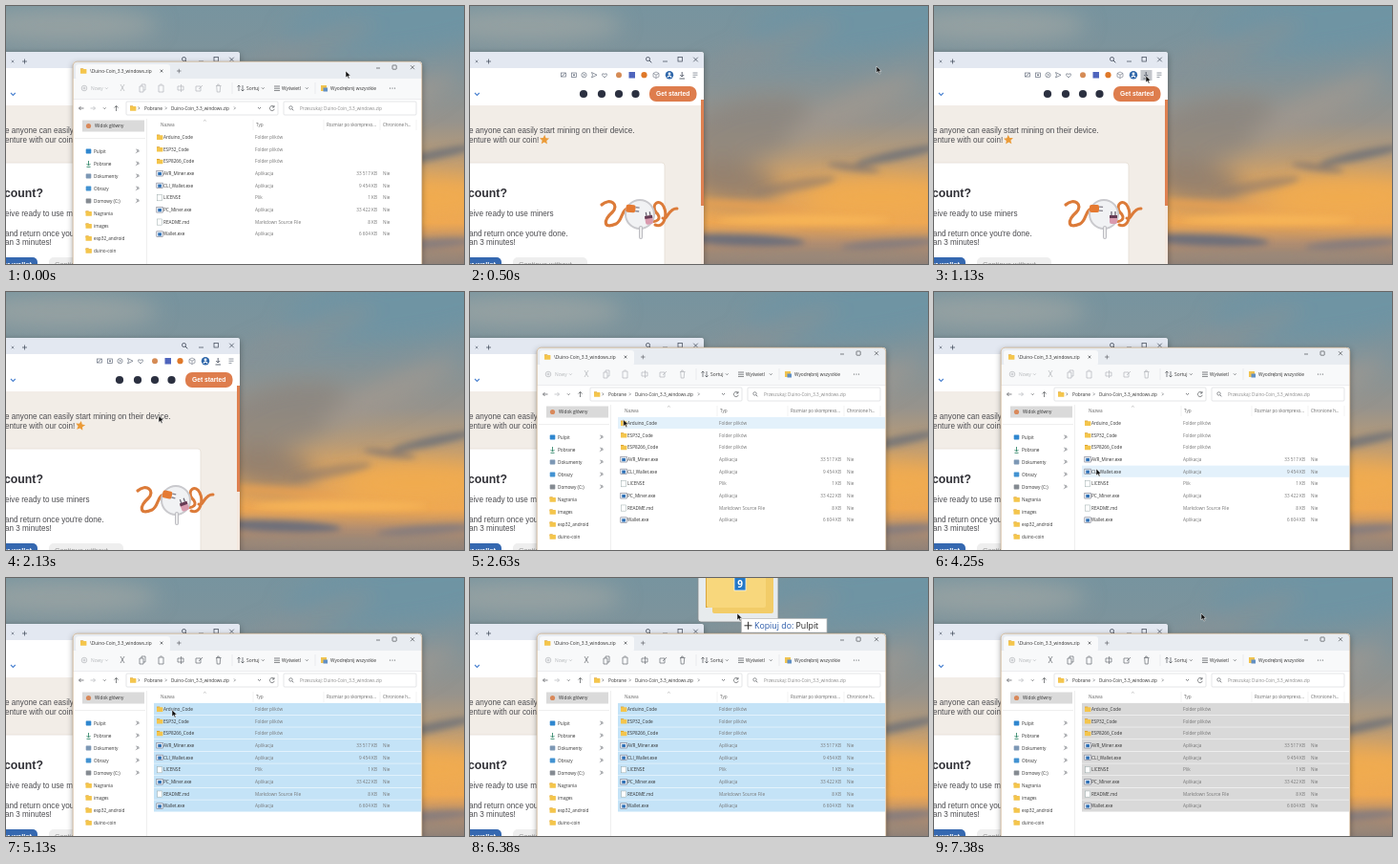
An HTML page that plays this animation: 480x270 px, repeating every 8 s.

```html
<!DOCTYPE html>
<html lang="pl">
<head>
<meta charset="utf-8">
<style>
html, body { margin: 0; width: 100%; height: 100%; overflow: hidden; }
svg { display: block; width: 480px; height: 270px; }
text { font-family: "Open Sans", "Noto Sans", sans-serif; white-space: pre; }
.page text { font-family: "Liberation Sans", Arial, sans-serif; }
</style>
</head>
<body>
<svg id="stage" viewBox="0 0 480 270" xmlns="http://www.w3.org/2000/svg"></svg>
<script>
const stage = document.getElementById('stage');

const rect = (x, y, w, h, fill, more = '') =>
  `<rect x="${x}" y="${y}" width="${w}" height="${h}" fill="${fill}" ${more}/>`;
const disc = (x, y, r, fill, more = '') =>
  `<circle cx="${x}" cy="${y}" r="${r}" fill="${fill}" ${more}/>`;
const line = (d, color = '#555', w = .7, more = '') =>
  `<path d="${d}" fill="none" stroke="${color}" stroke-width="${w}" ${more}/>`;
const text = (x, y, s, size = 4.7, fill = '#333', more = '') =>
  `<text x="${x}" y="${y}" font-size="${size}" fill="${fill}" ${more}>${s}</text>`;
const cross = (x, y, r, color) =>
  line(`M${x - r} ${y - r}l${2 * r} ${2 * r}m0 ${-2 * r}l${-2 * r} ${2 * r}`, color);
const box = (x, y, w, h, color, more = '') =>
  rect(x, y, w, h, 'none', `stroke="${color}" stroke-width=".7" ${more}`);
const folder = (x, y) =>
  rect(x - 3, y - 2.6, 3.2, 2, '#d99a25') + rect(x - 3, y - 1.9, 6.4, 4.6, '#f4c54c', 'rx=".5"');
const blob = (x, y, rx, ry, fill, o, turn = 0) =>
  `<ellipse cx="${x}" cy="${y}" rx="${rx}" ry="${ry}" fill="${fill}" opacity="${o}" transform="rotate(${turn} ${x} ${y})"/>`;
const gradient = (id, stops, dir) =>
  `<linearGradient id="${id}" ${dir}>${stops.map(([at, c]) => `<stop offset="${at}" stop-color="${c}"/>`).join('')}</linearGradient>`;

const defs = `<defs>
  ${gradient('sky', [[0, '#77949f'], [.25, '#80939a'], [.45, '#97938c'], [.58, '#b79b78'],
    [.7, '#dfa55e'], [.84, '#eea753'], [.92, '#b08d71'], [1, '#908278']], 'x2="0" y2="1"')}
  <filter id="soft" x="-50%" y="-80%" width="200%" height="260%"><feGaussianBlur stdDeviation="11"/></filter>
  <filter id="mist" x="-50%" y="-80%" width="200%" height="260%"><feGaussianBlur stdDeviation="3"/></filter>
  <filter id="shade" x="-10%" y="-10%" width="120%" height="120%"><feDropShadow dx="0" dy="2" stdDeviation="3" flood-opacity=".35"/></filter>
</defs>`;

function sky() {
  return rect(0, 0, 480, 270, 'url(#sky)') + `<g filter="url(#soft)">` +
    blob(60, 20, 100, 18, '#a9aaa5', .6) + blob(420, 15, 130, 34, '#6b95a5', .7, -8) +
    blob(310, 45, 80, 9, '#8d9293', .7, -20) + blob(290, 130, 70, 32, '#8b847d', .75, -15) +
    blob(400, 105, 80, 14, '#a69c91', .6, -25) + blob(275, 185, 50, 22, '#877a70', .8, 8) +
    blob(430, 200, 80, 22, '#f4ad4d', .8) + '</g><g filter="url(#mist)">' +
    blob(448, 156, 46, 5, '#666d79', .75, -12) + blob(402, 169, 28, 4, '#80766f', .7, 8) +
    blob(340, 188, 44, 6, '#927e6d', .6, -10) + blob(290, 209, 60, 5, '#e8a053', .8, 4) +
    blob(350, 224, 90, 5, '#f8b657', .9) + blob(285, 245, 66, 6, '#656c7d', .9, 2) +
    blob(440, 249, 52, 5, '#7b7880', .75, -4) + blob(350, 262, 130, 5, '#9b897b', .7) + '</g>';
}

function browser() {
  const dark = '#394252', gray = '#697180';
  let s = `<g class="page">` + rect(-20, 48, 265, 240, '#f2ede7', 'rx="3" filter="url(#shade)"') +
    rect(-20, 48, 265, 18, '#e3e8f1', 'rx="3"') + rect(-20, 65, 265, 39, '#fff') +
    cross(7, 58, 1.3, gray) + line('M17 58h5m-2.5 -2.5v5', dark) +
    disc(186.5, 55.5, 2, 'none', `stroke="${dark}" stroke-width=".8"`) + line('M188 57l2.3 2.3', dark, .9) +
    line('M202 58h5', dark) + box(218, 53.5, 4.5, 4.5, dark) + cross(236.5, 56, 2.3, dark);

  s += box(95.5, 70, 5, 4, gray) + line('M96 74l4 -4', gray) + box(106.5, 70, 5, 4.5, gray) +
    disc(109, 72.2, 1, gray) + disc(119.5, 72.2, 2.6, 'none', `stroke="${gray}" stroke-width=".7"`) +
    line('M118.5 71l2 1.2l-2 1.2', gray) + line('M127.5 69.5l5.5 2.7l-5.5 2.7l1 -2.7z', gray) +
    line('M141 75l-2.5 -2.7q-.5 -2.5 2.5 -1q3 -1.5 2.5 1z', gray) +
    disc(156, 72.2, 3, '#d58b55') + rect(166.5, 69, 6.5, 6.5, '#4f65bd') + disc(182.5, 72.2, 3.1, '#df7829') +
    line('M195 69l3 1.5v3.5l-3 1.5l-3 -1.5v-3.5zM192 70.5l3 1.6l3 -1.6m-3 1.6v3.4', gray, .6) +
    disc(209, 72.2, 4.2, '#2f67aa') + disc(209, 71, 1.4, '#fff') + line('M206.8 74.6q2.2 -3 4.4 0', '#fff', 1.2) +
    rect(216.5, 67, 12, 11, '#c3c6cb', 'id="press"') +
    line('M222.2 69v5m-2 -2l2 2l2 -2M219.5 76h5.5', dark, .8) +
    line('M233.5 70h5m-5 2.2h5m-5 2.2h3', gray);

  s += line('M5 91l2.4 2.4l2.4 -2.4', '#4d84d1', 1.2) +
    [119, 138, 156, 173.5].map(x => disc(x, 92, 4.1, '#2b3040')).join('') +
    rect(188, 84, 49.5, 16, '#de7d4d', 'rx="7"') +
    text(195, 94.4, 'Get started', 6.7, '#fff', 'font-weight="700"') +
    rect(242, 98, 3, 172, '#f4e8df') + rect(242, 98, 3, 111, '#de8050') +
    text(-1, 132.5, 'e anyone can easily start mining on their device.', 8.15, '#4c4c50') +
    text(-1, 142.8, 'enture with our coin!', 8.15, '#4c4c50') +
    `<path id="star" d="M0 -5L1.5 -1.7L5 -1.4L2.3 1L3.1 4.6L0 2.7L-3.1 4.6L-2.3 1L-5 -1.4L-1.5 -1.7Z" fill="#eb9b38"/>` +
    rect(-20, 164, 224, 130, '#fff', 'rx="3" stroke="#e5ddd5" stroke-width=".8"') +
    text(-2, 199.5, 'count?', 12.3, '#303036', 'font-weight="700"') +
    text(-1, 220, 'eive ready to use miners', 8.15, '#4c4c50') +
    text(-1, 240.5, "and return once you're done.", 8.15, '#4c4c50') +
    text(-1, 250.3, 'an 3 minutes!', 8.15, '#4c4c50') +
    rect(-20, 263, 53, 16, '#3568b0', 'rx="5"') + text(-3, 272.5, 'er wallet', 7.5, '#fff', 'font-weight="700"') +
    rect(45, 263, 78, 16, '#eeeeee', 'rx="5"') + text(51, 272.5, 'Continue without', 7.5, '#999');

  return s + line('M138 208C147 200 157 208 149 216C140 224 139 234 153 228C161 224 157 211 170 211', '#dc7b39', 3.2, 'stroke-linecap="round"') +
    line('M187 224C196 228 202 222 195 216C189 207 199 201 203 210C207 218 204 233 194 229M202 222C207 225 208 211 217 212', '#dc7b39', 3, 'stroke-linecap="round"') +
    disc(178, 218, 15, '#f1f2f4', 'stroke="#c9c9cd" stroke-width="2"') +
    `<g id="plugA">` + rect(-5, -4, 10, 8, '#e57a32', 'rx="2"') + line('M5 -2h4m-4 4h4', '#86828c', 1.3) + '</g>' +
    `<g id="plugB">` + rect(-4, -4, 8, 9, '#d99aae', 'rx="2"') + rect(-4, -4, 8, 3, '#663b54') + line('M-2 -4v-4m4 4v-4', '#66616e', 1.2) + '</g>' +
    line('M179 232v10', '#bcbcc1', 4, 'stroke-linecap="round"') + line('M179 232v10', '#eee', 2, 'stroke-linecap="round"') + '</g>';
}

const files = [
  ['Arduino_Code', 'Folder plików'], ['ESP32_Code', 'Folder plików'], ['ESP8266_Code', 'Folder plików'],
  ['AVR_Miner.exe', 'Aplikacja', '33 517 KB'], ['CLI_Wallet.exe', 'Aplikacja', '9 454 KB'],
  ['LICENSE', 'Plik', '1 KB'], ['PC_Miner.exe', 'Aplikacja', '33 422 KB'],
  ['README.md', 'Markdown Source File', '8 KB'], ['Wallet.exe', 'Aplikacja', '6 604 KB']];
const places = ['Pulpit', 'Pobrane', 'Dokumenty', 'Obrazy', 'Domowy (C:)', 'Nagrania', 'images', 'esp32_android', 'duino-coin'];
const rowY = i => 137.2 + i * 12.68;

function fileRow([name, type, size], i) {
  const y = rowY(i), base = y + 1.7;
  let icon = folder(161, y);
  if (size) icon = rect(158.7, y - 3, 5, 6.2, '#fff', 'stroke="#9aa" stroke-width=".5"');
  if (type === 'Aplikacja') icon = rect(157.8, y - 2.8, 6.6, 5.6, '#e8eef4', 'stroke="#667" stroke-width=".5"') + rect(159.3, y - 1.3, 3.6, 3.2, '#2d6fb5');
  return rect(155, y - 6.3, 280, 12.2, '#fff', 'class="row"') + icon + text(165, base, name) +
    text(261, base, type, 4.7, '#777') +
    (size ? text(389, base, size, 4.7, '#777', 'text-anchor="end"') + text(395, base, 'Nie', 4.7, '#777') : '');
}

function explorer() {
  const zip = 'Duino-Coin_3.3_windows.zip', faint = '#b4b7ba', ink = '#4c5054';
  let s = `<g id="explorer">` + rect(70, 58, 366, 230, '#fff', 'rx="4" filter="url(#shade)"') +
    rect(70, 58, 366, 25, '#e8ecf1', 'rx="4"') + rect(70, 76, 366, 22, '#f8f9fa') +
    rect(73, 61, 99, 16, '#f8f9fa', 'rx="3"') + folder(81, 68) +
    text(88, 69.9, '\\' + zip, 4.75) + cross(163, 68, 1.4, ink) + line('M179 68h4.5m-2.2 -2.2v4.5', ink, .6) +
    line('M388 65h4', ink) + box(405, 62, 4.2, 4.2, ink, 'rx=".6"') + cross(426, 64.2, 2, ink);

  s += disc(82, 86, 2.8, 'none', `stroke="${faint}" stroke-width=".7"`) + line('M80.5 86h3m-1.5 -1.5v3', faint) +
    text(89, 87.8, 'Nowy', 4.9, faint) + line('M104 85.4l1.4 1.4l1.4 -1.4', faint) +
    `<g id="tools" fill="none" stroke-width=".7">
      <path d="M120 82l4 7m0 -7l-4 7M140 84h4v6h-4zM142 84v-2h4v6h-2M160 83h5v7h-5zM161.5 82h2M180 84h6v4h-6zM183.5 82v8M199 84h5v5h-5zM202 87l4 -4M220 83.5h5.5m-4.8 0l.5 6.5h3l.5 -6.5m-3 0v-1.5h1.5v1.5"/></g>` +
    line('M244 89v-6m-1.6 1.6l1.6 -1.6l1.6 1.6M248 83v6m-1.6 -1.6l1.6 1.6l1.6 -1.6', ink) + text(252, 87.8, 'Sortuj', 4.9) +
    line('M268 85.4l1.3 1.3l1.3 -1.3M314 85.4l1.3 1.3l1.3 -1.3', ink) +
    line('M281 84h6m-6 2.2h6m-6 2.2h6', ink) + text(289, 87.8, 'Wyświetl', 4.9) +
    rect(330, 83, 6, 6, '#f0c350') + rect(332.5, 85.5, 4.5, 4, '#6290c4') + text(340, 87.8, 'Wyodrębnij wszystkie', 4.8) +
    [402.5, 405, 407.5].map(x => disc(x, 86, .6, ink)).join('') + line('M237 80v12M324 80v12', '#dedfe1', .5);

  s += line('M70.5 97.5h365', '#e4e5e7', .6) + line('M81.5 107h-5m2 -2l-2 2l2 2', ink) +
    line('M88.5 107h5m-2 -2l2 2l-2 2', faint) + line('M102 106.4l1.3 1.3l1.3 -1.3M115.5 110v-5.5m-2 2l2 -2l2 2', ink) +
    box(126, 100, 159, 14, '#d8dadd', 'rx="1"') + folder(133, 107) + text(145, 108.8, 'Pobrane', 4.8) +
    line('M138.5 105.5l1.4 1.4l-1.4 1.4M167 105.5l1.4 1.4l-1.4 1.4M239 105.5l1.4 1.4l-1.4 1.4', ink, .6) +
    text(173, 108.8, zip, 4.6) + line('M264 106l1.5 1.5l1.5 -1.5M280.8 105.4a2.5 2.5 0 1 0 .5 2.4M281 104v2h-2', ink) +
    box(291, 100, 139, 14, '#d8dadd', 'rx="1"') +
    disc(298.5, 106.4, 1.7, 'none', `stroke="${ink}" stroke-width=".6"`) + line('M299.8 107.8l1.5 1.5', ink) +
    text(308, 108.8, 'Przeszukaj: ' + zip, 4.6, '#888');

  s += rect(80, 119.5, 65, 12, '#dadada') + disc(86.5, 125.5, 2.6, '#d9895b') + text(93, 127.2, 'Widok główny') +
    line('M72 138.5h74', '#e5e5e5', .6) + line('M147.5 118v152', '#e5e5e5', .6);
  places.forEach((name, i) => {
    const y = 152 + i * 13;
    s += text(92, y + 1.8, name);
    if (i > 4) s += folder(86.5, y);
    else s += (i === 1 ? line(`M86.5 ${y - 3}v5m-2 -2l2 2l2 -2m-4 3.4h4`, '#36896c', .9)
      : rect(83.7, y - 2.6, 5.6, 5, ['#2f87cf', 0, '#7d98b5', '#4393d2', '#858b92'][i], 'rx=".7"')) +
      line(`M136 ${y - 2.3}l3.4 2.6m-1.4 -2.4l1.4 2.1l-2 1.2zM135.8 ${y + 2}l1.6 -1.4`, '#85898d', .6);
  });
  return s + text(162, 125.8, 'Nazwa', 4.7, '#666') + line('M207 120.5l1.4 -1.2l1.4 1.2', '#888', .5) +
    text(262, 125.8, 'Typ', 4.7, '#666') + text(336, 125.8, 'Rozmiar po skompreso...', 4.5, '#666') +
    text(395, 125.8, 'Chronione h...', 4.5, '#666') +
    line('M259 119v11M333 119v11M392 119v11M430 119v11', '#e4e4e4', .5) +
    files.map(fileRow).join('') +
    box(70.2, 58.2, 365.6, 230, '#c9aa83', 'rx="4"') + '</g>';
}

// Positioned around the pointer tip.
const ghost = `<g id="ghost">` +
  rect(-41, -75, 84, 84, '#fff', 'rx="3" opacity=".82" stroke="#888" stroke-width=".8"') +
  `<path d="M-33 -62h25l5 6h35v50h-65z" fill="#d9a63d"/>` + rect(-26, -52, 64, 52, '#f2cc68', 'rx="2"') +
  rect(-32, -56, 62, 50, '#f8d77c', 'rx="2"') +
  rect(-3, -38, 12, 14, '#2378c7', 'stroke="#fff" stroke-width=".7"') +
  text(3, -27.3, '9', 10, '#fff', 'text-anchor="middle" font-weight="700"') +
  `<g id="label">` + rect(4.5, 5.5, 89.5, 14.5, '#fff', 'stroke="#b7b7b7" stroke-width=".7"') +
  line('M7.5 12.8h8m-4 -4v8', '#333', 1) +
  text(18, 16, 'Kopiuj do: <tspan fill="#222">Pulpit</tspan>', 8.8, '#2858a8') + '</g></g>';
const pointer = `<path id="pointer" d="M0 0v7l1.7 -1.5l1.2 2.6l1.2 -.6l-1.2 -2.5h2.3z" fill="#111" stroke="#fff" stroke-width=".5"/>`;

stage.innerHTML = defs + sky() + browser() + explorer() + ghost + pointer;

const el = id => document.getElementById(id);
const rows = [...document.querySelectorAll('.row')];
const move = (id, x, y, turn = 0) => el(id).setAttribute('transform', `translate(${x} ${y}) rotate(${turn})`);
const show = (id, on) => el(id).setAttribute('opacity', +on);

const path = [[0, 356, 68], [125, 356, 68], [375, 426, 63], [500, 426, 63], [1000, 222, 73], [1250, 222, 73],
  [1750, 165, 125], [2125, 160, 129.5], [2500, 160, 129.5], [3250, 170, 185], [4250, 170, 185],
  [5000, 174, 138], [5375, 174, 138], [6125, 276, 40], [6375, 280, 37], [8000, 280, 37]];
const ease = p => p * p * (3 - 2 * p);

function pointerAt(t) {
  const i = path.findIndex(k => k[0] > t), [t0, x0, y0] = path[i - 1], [t1, x1, y1] = path[i];
  const p = ease((t - t0) / (t1 - t0));
  return [x0 + (x1 - x0) * p, y0 + (y1 - y0) * p];
}

function draw(now) {
  const t = Math.floor(now % 8000 / 125) * 125; // eight poses a second
  const [x, y] = pointerAt(t);
  const open = t < 500 || t >= 2500, selected = t >= 4625, dropped = t >= 6875;
  const drag = t >= 5500 && !dropped;
  move('pointer', x, y);
  move('ghost', x, y);
  show('ghost', drag);
  show('label', drag && y < 58);
  show('explorer', open);
  show('press', t >= 1000 && t < 1375);
  el('tools').setAttribute('stroke', selected ? '#666b70' : '#b4b7ba');
  rows.forEach((row, i) => {
    const hover = open && Math.abs(y + 2 - rowY(i)) < 6.3 && x > 155;
    row.setAttribute('fill', dropped ? '#d9d9d9' : selected ? '#c4e3f7' : hover ? '#e3f1fb' : '#fff');
  });
  const swing = Math.sin((t - 2125) / 1000 * Math.PI / 2);
  move('star', 78, 139.8, 10 + 14 * swing);
  move('plugA', 169 + swing, 212, 12 + 10 * swing);
  move('plugB', 187 - swing, 224 + swing, -20 - 20 * swing);
}

function tick(now) {
  draw(now);
  requestAnimationFrame(tick);
}
draw(0);
requestAnimationFrame(tick);
</script>
</body>
</html>
```
